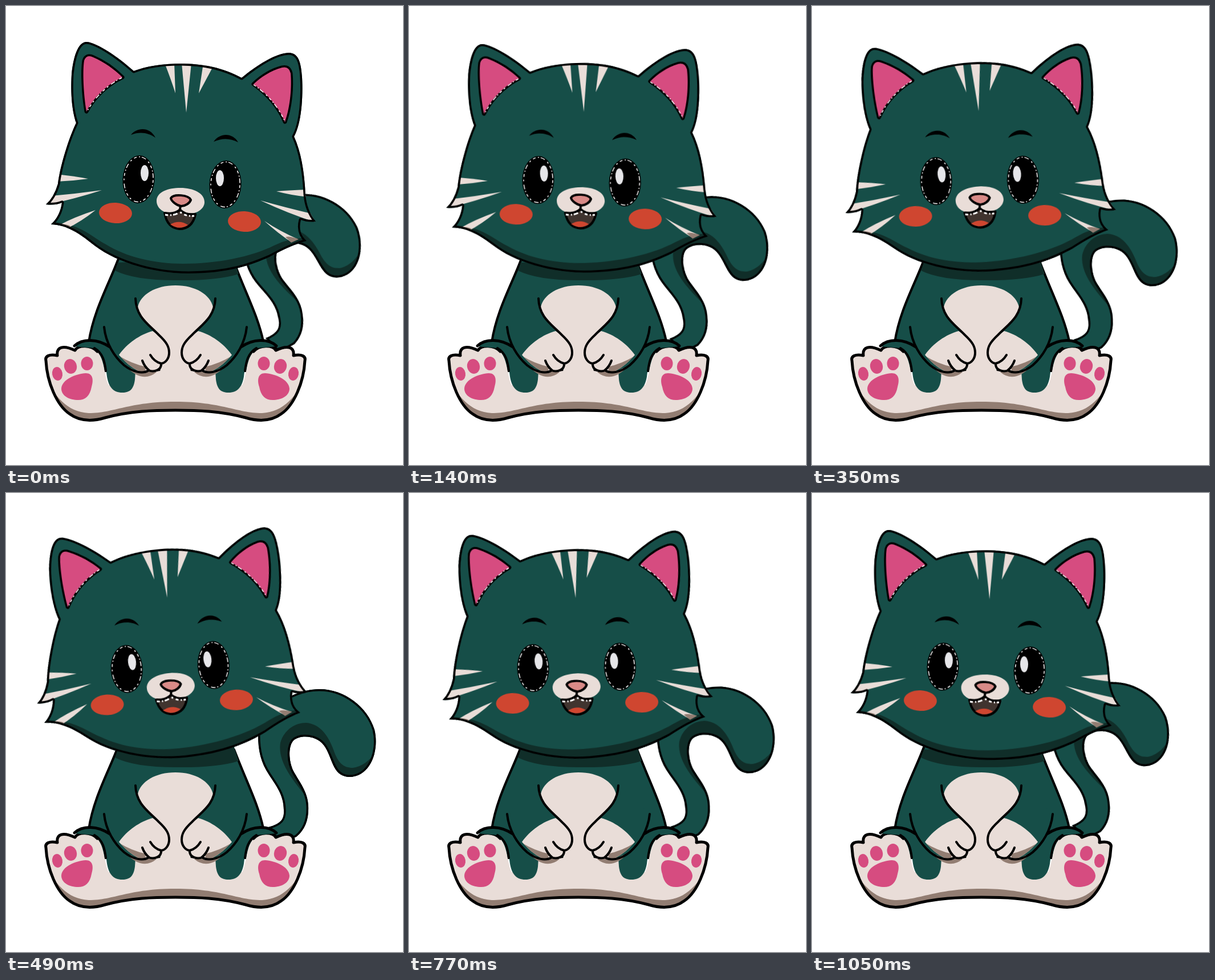
An HTML page that plays this animation: 696 px wide and 805 px high, repeating every 1120 ms.

```html
<!DOCTYPE html>
<html lang="en">
<head>
<meta charset="utf-8">
<title>Swaying kitten</title>
<style>
  html, body { margin: 0; width: 100%; height: 100%; overflow: hidden; background: #fff; }
  svg { display: block; width: 696px; height: 805px; }

  .coat { fill: #164e48; }
  .dark { fill: #102e29; }
  .cream { fill: #e9ddd8; }
  .dusk { fill: #927d72; }
  .pink { fill: #d64c80; }
  .red { fill: #cf4630; }
  .line { stroke: #000; stroke-width: 4; stroke-linejoin: round; stroke-linecap: round; }
  .open { fill: none; }
  .bold { stroke-width: 5; }
  .inner { stroke-width: 7; } /* clipped to its shape, so half of it shows */
  .outer { stroke-width: 7; paint-order: stroke; }
  .fleck { fill: none; stroke: #fff; stroke-width: 1.5; stroke-dasharray: 5 4 2 3 8 6 3 5; }

  /* eight hard steps each way, 70 ms apart */
  .head, .tail { animation: 1120ms steps(8, end) infinite; }
  .head { transform-origin: 266px 505px; animation-name: nod; }
  .tail { transform-origin: 433px 620px; animation-name: wag; }
  @keyframes nod {
    0%, 100% { transform: rotate(0deg); }
    50% { transform: rotate(-6.85deg); }
  }
  @keyframes wag {
    0%, 100% { transform: rotate(-7.875deg); }
    50% { transform: rotate(1.125deg); }
  }
</style>
</head>
<body>
<svg viewBox="0 0 696 805">
  <defs>
    <path id="skull" d="M123 205 C110 232 95 280 91 312 Q84 336 70 348 Q86 350 98 345 Q95 368 79 383
      C108 384 130 400 150 416 C185 445 250 469 320 469 C390 469 430 454 462 440 C488 426 505 418 527 412
      Q511 398 517 375 Q529 380 543 378 Q527 358 525 330 C523 290 517 255 505 229
      C518 206 521 160 519 125 C517 96 512 83 496 82 C472 83 440 104 413 126
      C380 108 345 101 305 101 C275 101 245 106 224 114 C195 88 160 65 142 63
      C126 62 118 90 115 120 C113 155 116 185 123 205 Z"/>
    <clipPath id="skullClip"><use href="#skull"/></clipPath>

    <path id="seat" d="M70 622 C68 614 76 610 90 613 C88 598 100 594 121 604 C126 594 150 594 160 606
      C174 622 172 650 180 665 L297 640 L414 665 C422 650 420 622 434 606
      C444 594 468 594 473 604 C494 594 506 598 504 613 C518 610 526 614 524 622
      C522 660 505 700 483 715 C463 730 440 728 420 722 C375 710 335 708 297 708
      C259 708 219 710 174 722 C154 728 131 730 111 715 C89 700 72 660 70 622 Z"/>
    <clipPath id="seatClip"><use href="#seat"/></clipPath>

    <path id="tailShape" d="M460 586 C482 580 488 572 487 556 C487 530 474 514 461 494 C447 473 442 452 442 425
      C450 385 495 345 548 344 C592 343 634 375 646 415 C655 452 639 499 600 498
      C571 495 573 463 557 442 C544 425 515 423 503 435 C494 447 496 472 504 488
      C515 508 529 524 530 549 C531 572 525 590 509 603 L480 615 Z"/>
    <clipPath id="tailClip"><use href="#tailShape"/></clipPath>

    <path id="pawShape" d="M198 612 C212 592 235 576 257 570 C274 582 286 594 286 608
      C286 618 280 626 272 627 C272 638 262 643 250 639 C242 646 225 642 198 612 Z"/>
    <clipPath id="pawClip"><use href="#pawShape"/></clipPath>

    <g id="leg">
      <path class="coat" d="M145 585 C172 582 190 598 212 628 L227 640 L226 655 C224 672 217 678 204 678
        C188 678 180 668 177 650 C174 626 172 612 155 600 L120 597 Q130 586 145 585 Z"/>
      <path class="line open bold" d="M120 596 C134 583 160 583 182 598"/>
    </g>

    <g id="pads" class="pink">
      <ellipse cx="90" cy="645" rx="9" ry="12" transform="rotate(-10 90 645)"/>
      <ellipse cx="113" cy="632" rx="11" ry="13" transform="rotate(-15 113 632)"/>
      <ellipse cx="142" cy="627" rx="10.5" ry="12"/>
      <path d="M97 671 C98 655 122 645 140 644 C152 644 154 655 150 668 C147 685 138 692 124 691 C108 690 97 682 97 671 Z"/>
    </g>

    <g id="arm">
      <path class="dusk" d="M212 634 Q240 662 264 642 Z"/>
      <path class="coat" d="M172 563 L227 512 C228 546 250 558 268 577 L240 615 L230 641 C200 626 176 600 172 563 Z"/>
      <use href="#pawShape" class="cream"/>
      <path class="dusk" clip-path="url(#pawClip)" d="M190 608 Q215 626 246 633 L240 650 L200 640 Z"/>
      <path class="line open" d="M227 513 C228 546 250 558 268 577 C282 590 286 598 286 608 C286 618 280 626 272 627
        C273 638 260 643 250 639 C240 646 222 642 207 630 C190 615 175 592 172 563"/>
      <path class="line open" d="M253 612 Q260 624 272 627 M239 622 Q243 633 251 639"/>
    </g>

    <g id="eye">
      <ellipse rx="28" ry="42"/>
      <ellipse class="fleck" rx="25.5" ry="39.5"/>
    </g>
  </defs>

  <g class="tail">
    <use href="#tailShape" class="coat"/>
    <g clip-path="url(#tailClip)">
      <path class="dark" d="M524 530 C500 500 476 470 481 438 C488 414 508 403 526 403
        C552 405 566 428 574 450 C582 474 592 482 608 482 Q634 478 650 450 L650 510 L580 510 L530 440 L510 445 Z"/>
      <use href="#tailShape" class="line open inner"/>
    </g>
  </g>

  <g class="body">
    <path class="coat line" d="M200 435 C185 480 154 530 145 590 L145 640 L449 640 L451 588 C442 545 423 510 400 450 Z"/>
    <path class="dark" d="M196 450 L191 464 Q225 481 297 481 Q370 482 408 470 L398 440 Z"/>
    <path class="cream" d="M297 490 C262 490 236 506 231 528 C235 550 252 560 268 577 L284 600 L270 640 L225 645 L220 680
      L374 680 L369 645 L324 640 L310 600 L326 577 C342 560 359 550 363 528 C358 506 332 490 297 490 Z"/>
    <use href="#seat" class="cream"/>
    <path class="dusk" clip-path="url(#seatClip)" d="M66 640 C80 680 105 712 145 714 C190 714 215 694 297 694
      C379 694 404 714 449 714 C489 712 514 680 528 640 L540 740 L60 740 Z"/>
    <path class="line open bold" d="M160 606 C150 594 126 594 121 604 C100 594 88 598 90 613 C76 610 68 614 70 622
      C72 660 89 700 111 715 C131 730 154 728 174 722 C219 710 259 709 297 709
      C335 709 375 710 420 722 C440 728 463 730 483 715 C505 700 522 660 524 622
      C526 614 518 610 504 613 C506 598 494 594 473 604 C468 594 444 594 434 606"/>
    <use href="#leg"/>
    <use href="#leg" transform="translate(594) scale(-1 1)"/>
    <path class="line open" d="M155 600 C170 609 173 624 175 640 M439 600 C424 609 421 624 419 640"/>
    <use href="#pads"/>
    <use href="#pads" transform="translate(594) scale(-1 1)"/>
    <use href="#arm"/>
    <use href="#arm" transform="translate(594) scale(-1 1)"/>
  </g>

  <g class="head">
    <use href="#skull" class="coat"/>
    <g clip-path="url(#skullClip)">
      <path class="dark" d="M70 378 C130 380 145 402 175 418 C210 440 260 452 310 452 C370 452 430 440 470 420
        Q500 405 530 407 L530 480 L70 480 Z"/>
      <g class="cream">
        <path d="M278 100 H295 L297 153 Q289 128 278 100 Z"/>
        <path d="M308 100 H325 L316 187 Z"/>
        <path d="M346 100 L362 108 L338 153 Z"/>
        <path d="M88 295 Q118 298 144 303 Q116 307 88 308 Z"/>
        <path d="M80 333 Q125 329 168 323 Q122 338 70 349 Z"/>
        <path d="M157 358 Q120 370 94 384 L107 390 Q132 378 157 358 Z"/>
        <path d="M474 325 Q500 323 530 322 V335 Q500 332 474 325 Z"/>
        <path d="M446 341 Q492 354 535 364 L542 379 Q495 364 446 341 Z"/>
        <path d="M453 377 Q480 395 512 409 L500 414 Q476 398 453 377 Z"/>
      </g>
      <path class="dusk" d="M92 383 Q104 381 113 386 L105 391 Z M490 405 Q498 403 513 409 L500 415 Z"/>
      <use href="#skull" class="line open inner"/>
    </g>

    <path class="pink line outer" d="M141 185 C136 155 134 115 137 96 Q141 84 153 90 C172 98 190 111 204 125 C180 136 155 158 141 185 Z"/>
    <path class="fleck" d="M203 126 C180 137 156 159 142 185"/>
    <path class="pink line outer" d="M489 203 C499 175 501 140 499 118 Q496 105 484 108 C464 113 447 125 434 137 C455 152 477 174 489 203 Z"/>
    <path class="fleck" d="M434 138 C456 153 477 175 489 203"/>

    <path d="M219 226 C229 213 252 211 262 231 C249 222 235 220 219 226 Z"/>
    <path d="M364 238 C376 221 398 223 407 239 C393 232 380 231 364 238 Z"/>

    <use href="#eye" transform="translate(232.5 304) rotate(3)"/>
    <use href="#eye" transform="translate(384.5 313) rotate(3)"/>
    <ellipse cx="243" cy="293" rx="7" ry="14" fill="#e6e6e9"/>
    <ellipse cx="375" cy="302" rx="7" ry="14" fill="#e6e6e9"/>

    <ellipse class="red" cx="192" cy="363" rx="29" ry="18" transform="rotate(3 192 363)"/>
    <ellipse class="red" cx="418" cy="378" rx="29" ry="18" transform="rotate(3 418 378)"/>

    <path class="line" fill="#40342f" d="M278 363 Q293 366 305 357 Q316 367 332 366 C328 383 318 391 304 391 C290 390 281 380 278 363 Z"/>
    <path class="red" d="M288 383 Q304 374 319 384 Q304 394 288 383 Z"/>
    <path class="cream" d="M264 342 C264 326 284 319 306 319 C328 319 348 328 348 344 C348 360 322 372 305 357 C290 371 264 360 264 342 Z"/>
    <path class="line open" d="M306 349 L305 357 Q296 366 279 363 M305 357 Q314 367 332 365"/>
    <path class="fleck" style="stroke-width:3" d="M279 366 Q295 369 305 361 Q316 370 330 368"/>
    <path class="line" fill="#d98a87" d="M289 337 C294 329 320 331 324 340 C322 346 314 351 307 351 C300 350 290 343 289 337 Z"/>
  </g>
</svg>
</body>
</html>
```
